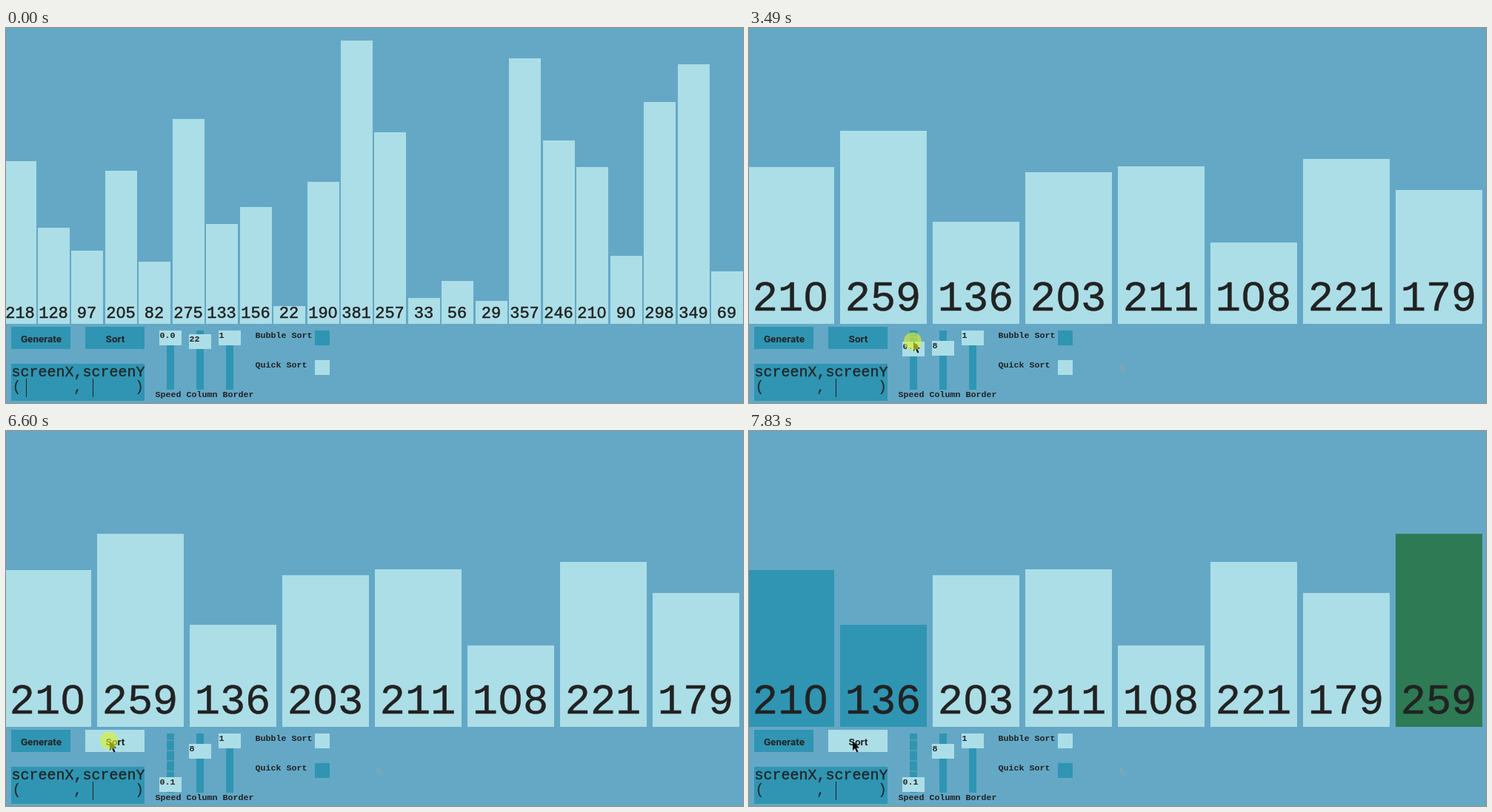
An HTML page with a canvas that plays this animation: 995 px wide and 507 px high, repeating every 8 s.

```html
<!DOCTYPE html>
<html lang="en">
<head>
<meta charset="utf-8">
<title>Sorting visualizer</title>
<style>
  html, body { margin: 0; width: 100%; height: 100%; overflow: hidden; background: #64a8c6; }
  canvas { display: block; }
</style>
</head>
<body>
<canvas id="stage" width="995" height="507"></canvas>
<script>
const ctx = document.getElementById('stage').getContext('2d');
const LOOP = 8000, TRAVEL = 560, TICK = 93, SORT_START = 6608;
const BACK = '#64a8c6', LIGHT = '#acdee7', DARK = '#2f95b2', GREEN = '#2d7a54', INK = '#222';
const FAINT = 'rgba(150,165,165,.4)';
const MONO = '"Liberation Mono", monospace';
const SMALL = 'bold 11.667px ' + MONO;
const ARROW = new Path2D('M0 0V13L3 10L5.5 15.5L7.5 14.5L5 9.5H9Z');

const manyBars = [218, 128, 97, 205, 82, 275, 133, 156, 22, 190, 381,
                  257, 33, 56, 29, 357, 246, 210, 90, 298, 349, 69];
const fewBars = [210, 259, 136, 203, 211, 108, 221, 179];

// The pointer visits one control after another, presses it and may drag down.
const home = { x: 502, y: 452, drag: 0 };
const column = { x: 265, y: 420, arrive: 770, press: 910, release: 1620, drag: 2.5 };
const generate = { x: 73, y: 415, arrive: 2450, press: 2550, release: 2790, drag: 0 };
const speed = { x: 222, y: 415, arrive: 3330, press: 3330, release: 4680, drag: 62 };
const bubble = { x: 425, y: 418, arrive: 5400, press: 5490, release: 5750, drag: 0 };
const sort = { x: 140, y: 419, arrive: 6330, press: 6520, release: 6690, drag: 0 };
const stops = [column, generate, speed, bubble, sort];

const clamp = (v, lo, hi) => Math.min(hi, Math.max(lo, v));
const isPressed = (stop, t) => t >= stop.press && t < stop.release;

function dragY(stop, t) {
  const u = (t - stop.press) / (stop.release - stop.press);
  return Math.round(stop.y + stop.drag * clamp(u * 1.2, 0, 1));
}

function pointerAt(t) {
  const i = stops.findLastIndex(stop => t >= stop.arrive - TRAVEL);
  if (i < 0) return home;
  const to = stops[i], from = stops[i - 1] || home;
  if (t >= to.arrive) return { x: to.x, y: dragY(to, t) };
  const u = 1 - (to.arrive - t) / TRAVEL, e = u * u * (3 - 2 * u);
  const startY = from.y + from.drag;
  return {
    x: Math.round(from.x + (to.x - from.x) * e),
    y: Math.round(startY + (to.y - startY) * e - 10 * Math.sin(Math.PI * u))
  };
}

// Bubble sort in which each comparison and each swap takes one tick.
function sortState(ticks) {
  const values = [...fewBars];
  for (let end = values.length - 1; end > 0; end--) {
    for (let i = 0; i < end; i++) {
      if (--ticks < 0) return { values, active: i, end };
      if (values[i] <= values[i + 1]) continue;
      [values[i], values[i + 1]] = [values[i + 1], values[i]];
      if (--ticks < 0) return { values, active: i, end };
    }
  }
  return { values, active: -2, end: -1 };
}

function rect(color, x, y, w, h) {
  ctx.fillStyle = color;
  ctx.fillRect(x, y, w, h);
}

function text(str, x, y, font, align = 'left', thicken = 0) {
  ctx.font = font;
  ctx.textAlign = align;
  ctx.fillStyle = ctx.strokeStyle = INK;
  ctx.fillText(str, x, y);
  if (!thicken) return;
  ctx.lineWidth = thicken;
  ctx.strokeText(str, x, y);
}

// Bar numbers use open zeros, so the dot inside each zero is covered.
function barNumber(value, x, y, size, color) {
  const str = String(value);
  text(str, x, y, size + 'px ' + MONO, 'center', 0.5);
  [...str].forEach((digit, i) => {
    if (digit !== '0') return;
    const cx = x + (i + 0.5 - str.length / 2) * size * 0.6;
    rect(color, cx - size * 0.085, y - size * 0.45, size * 0.17, size * 0.24);
  });
}

function drawBars(values, pitch, width, size, baseline, colorOf) {
  values.forEach((v, i) => {
    const x = Math.floor(i * pitch - 2), color = colorOf(i);
    rect(color, x, 398 - v, width, v + 2);
    barNumber(v, x + width / 2 - 0.5, baseline, size, color);
  });
}

function drawSorting(t) {
  const sorting = t >= SORT_START;
  const { values, active, end } = sortState(Math.max(0, Math.floor((t - SORT_START) / TICK)));
  drawBars(values, 125, 117, 57, 381.5, i =>
    !sorting ? LIGHT : i > end ? GREEN : i === active || i === active + 1 ? DARK : LIGHT);
}

function button(label, x, pointer) {
  const hover = pointer.x >= x && pointer.x < x + 80 && pointer.y >= 404 && pointer.y < 434;
  rect(hover ? LIGHT : DARK, x, 404, 80, 30);
  text(label, x + 40.5, 425, 'bold 13.5px Roboto, sans-serif', 'center');
}

function knob(x, y, label) {
  rect(LIGHT, x, y, 30, 20);
  text(label, x + 0.5, y + 10, SMALL);
}

function checkBox(label, y, checked) {
  text(label, 336.5, y + 10, SMALL);
  rect(checked ? LIGHT : DARK, 417, y, 20, 20);
}

function arrow(x, y, color) {
  ctx.save();
  ctx.translate(x, y);
  ctx.fillStyle = color;
  ctx.fill(ARROW);
  ctx.restore();
}

function drawCoordinates(t) {
  const font = '20px ' + MONO;
  rect(DARK, 7, 454, 180, 50);
  text('screenX,screenY', 7.5, 471, font, 'left', 0.3);
  text('(', 14.5, 491, font, 'center');
  text(',', 97, 491, font, 'center');
  text(')', 180, 491, font, 'center');
  const caretOn = t < sort.arrive && Math.floor((t + 290) / 500) % 2 === 0;
  if (caretOn) rect(INK, 27, 474, 1, 25);
  rect(INK, 117, 474, 1, 25);
}

function drawSliders(t) {
  for (let x = 217; x <= 297; x += 40) rect(DARK, x, 409, 10, 80);
  text('Speed Column Border', 201.5, 499, SMALL);

  const speedY = t < speed.press ? 409 : Math.min(468, dragY(speed, t));
  const columnDrag = dragY(column, t);
  const columnY = columnDrag > column.y ? columnDrag : 414;

  // Faint streaks stay on the speed track where the pointer passed.
  for (let y = 417; y < speedY; y += 14) rect(FAINT, 217, y, 10, 2);
  knob(207, speedY, speedY < 439 ? '0.0' : '0.1');
  knob(247, columnY, Math.floor(22 - (columnY - 414) * 1.55));
  knob(287, 409, '1');
}

function draw(t) {
  const pointer = pointerAt(t);
  rect(BACK, 0, 0, 995, 507);
  if (t < generate.press) drawBars(manyBars, 45.45, 43, 22, 391.5, () => LIGHT);
  else drawSorting(t);

  button('Generate', 7, pointer);
  button('Sort', 107, pointer);
  drawCoordinates(t);
  drawSliders(t);
  checkBox('Bubble Sort', 409, t >= bubble.press);
  checkBox('Quick Sort', 449, t < bubble.press);

  if (t < 70) return;
  arrow(home.x - 1, home.y + 1, FAINT);
  arrow(pointer.x, pointer.y, '#0c0c0c');
  if (stops.some(stop => isPressed(stop, t))) {
    ctx.fillStyle = 'rgba(222,242,40,.62)';
    ctx.beginPath();
    ctx.arc(pointer.x - 1, pointer.y - 0.5, 12, 0, Math.PI * 2);
    ctx.fill();
  }
}

function tick() {
  draw(performance.now() % LOOP);
  requestAnimationFrame(tick);
}
tick();
</script>
</body>
</html>
```
